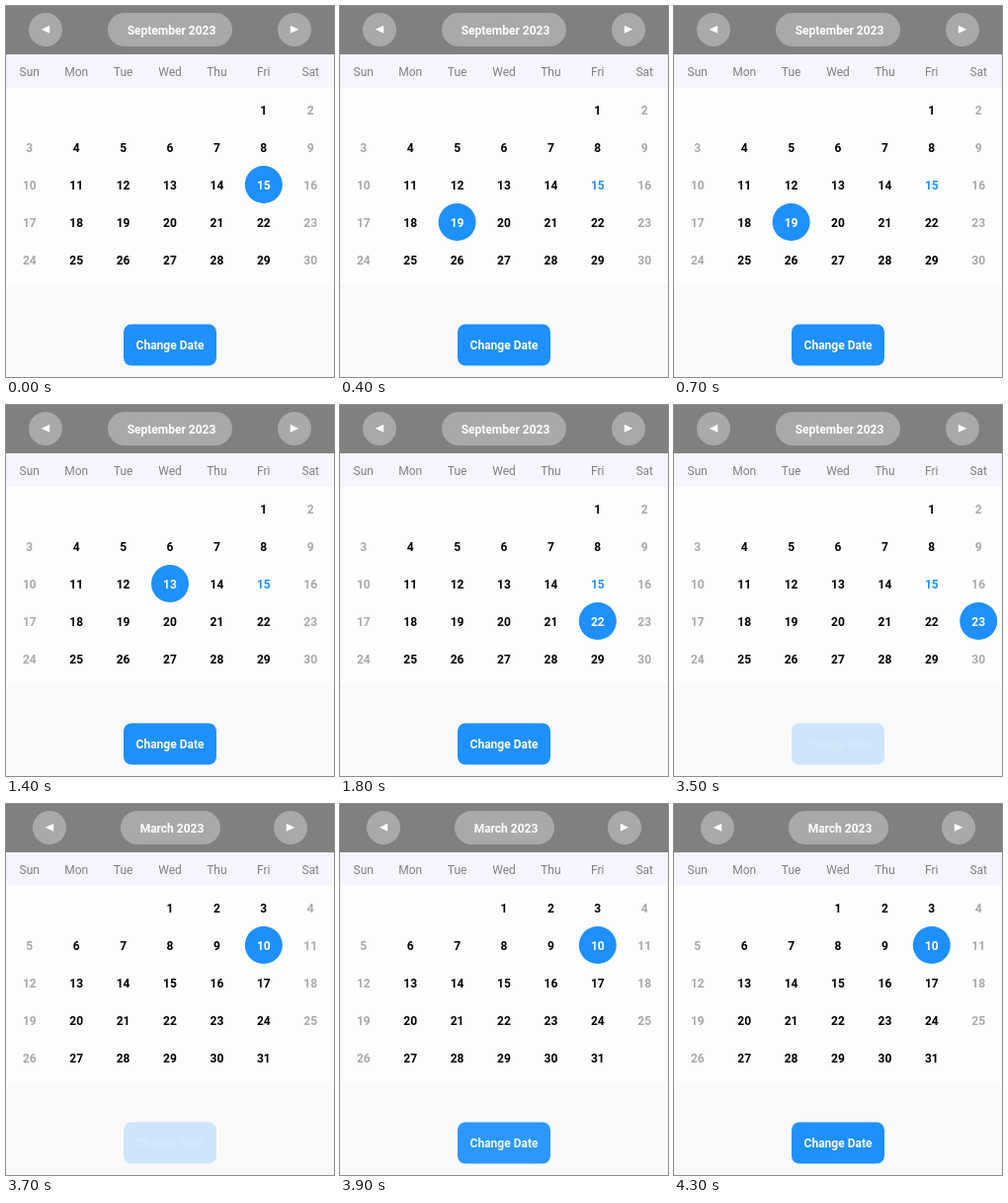
Animation, 332 px wide and 376 px high, one loop 5900 ms. Source, as an HTML page with a canvas:

```html
<!DOCTYPE html>
<html lang="en">
<head>
<meta charset="utf-8">
<title>Date picker</title>
<style>
  html, body { margin: 0; width: 100%; height: 100%; overflow: hidden; background: #f9f9f9; }
  canvas { display: block; }
</style>
</head>
<body>
<canvas id="stage" width="332" height="376"></canvas>
<script>
const ctx = document.getElementById('stage').getContext('2d');
const LOOP = 5900, STEP = 100, RELEASE = 3700;
const BLUE = '#1e90ff', GRAY = '#808080', LIGHT = '#a9a9a9';

const september = { title: 'September 2023', first: 5, days: 30, today: 15, left: 103, width: 126, arrow: 40 };
const march = { title: 'March 2023', first: 3, days: 31, left: 116, width: 101, arrow: 44 };

// [start time, month, selected day]
const selections = [
  [0, september, 15],
  [300, september, 19],
  [900, september, 13],
  [1500, september, 22],
  [2000, september, 23],
  [RELEASE, march, 10]
];

const columnX = i => 23.8 + 47.4 * i;

function box(x, y, w, h, r, color) {
  ctx.fillStyle = color;
  ctx.beginPath();
  ctx.roundRect(x, y, w, h, r);
  ctx.fill();
}

function circle(x, y, r, color) {
  box(x - r, y - r, 2 * r, 2 * r, r, color);
}

function label(text, x, y, color, weight = 700) {
  ctx.font = `${weight} 12px Roboto, sans-serif`;
  ctx.fillStyle = color;
  ctx.fillText(text, x, y + 4.2);
}

function arrow(x, direction) {
  circle(x, 24, 17, LIGHT);
  ctx.fillStyle = '#fff';
  ctx.beginPath();
  ctx.moveTo(x + 4.2 * direction, 23.7);
  ctx.lineTo(x - 4.2 * direction, 19.7);
  ctx.lineTo(x - 4.2 * direction, 27.7);
  ctx.fill();
}

function drawHeader(month) {
  box(0, 0, 332, 49, 0, GRAY);
  box(month.left, 7, month.width, 34, 17, LIGHT);
  label(month.title, month.left + month.width / 2 + 1.5, 24.5, '#fff');
  arrow(month.arrow, -1);
  arrow(332 - month.arrow, 1);
  box(0, 49, 332, 34, 0, '#f5f5ff');
  'Sun Mon Tue Wed Thu Fri Sat'.split(' ')
    .forEach((name, i) => label(name, columnX(i), 66.3, GRAY, 400));
}

function drawDays(month, selected) {
  box(0, 83, 332, 199, 0, '#fdfdfd');
  for (let day = 1; day <= month.days; day++) {
    const cell = month.first + day - 1, column = cell % 7;
    const x = columnX(column), y = 105.5 + 38 * Math.floor(cell / 7);
    let color = column % 6 ? '#000' : LIGHT;
    if (day === month.today) color = BLUE;
    if (day === selected) {
      circle(x, y - 0.5, 19, BLUE);
      color = '#fff';
    }
    label(day, x, y, color);
  }
}

// Pressed at once, then faded back with a quadratic ease in and out.
function buttonOpacity(t) {
  if (t < 3500) return 1;
  const p = Math.min(Math.max((t - RELEASE) / 250, 0), 1);
  return 0.2 + 0.8 * (p < 0.5 ? 2 * p * p : 1 - 2 * (1 - p) ** 2);
}

function draw(now) {
  const t = Math.floor((now % LOOP) / STEP) * STEP;
  const [, month, selected] = selections.findLast(s => s[0] <= t);
  ctx.textAlign = 'center';
  box(0, 0, 332, 376, 0, '#f9f9f9');
  drawHeader(month);
  drawDays(month, selected);
  ctx.globalAlpha = buttonOpacity(t);
  box(119, 322.5, 94, 42, 8, BLUE);
  label('Change Date', 166, 343.8, '#fff');
  ctx.globalAlpha = 1;
}

let start;
function tick(now) {
  start ??= now;
  draw(now - start);
  requestAnimationFrame(tick);
}
requestAnimationFrame(tick);
</script>
</body>
</html>
```
